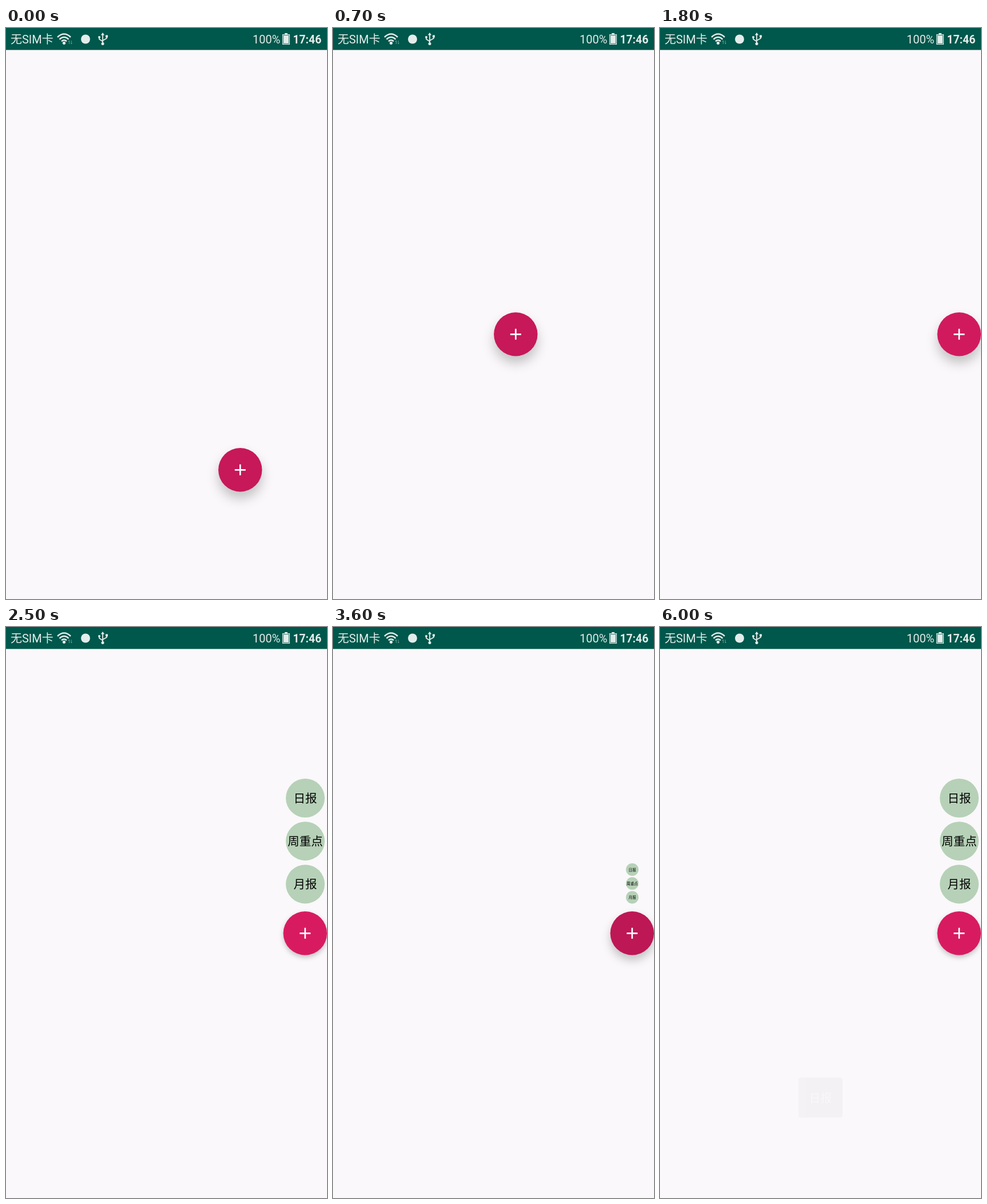
Animation of 561 by 998 pixels, one loop 6100 ms. Source, as an HTML page:

```html
<!DOCTYPE html>
<html lang="zh-CN">
<head>
<meta charset="utf-8">
<title>Floating button menu</title>
<style>
  html, body { margin: 0; width: 100%; height: 100%; overflow: hidden; background: #faf8fa; }
  svg { display: block; width: 100vw; height: 100vh; }
  text { font: 20px Roboto, "Noto Sans CJK SC", "Noto Sans CJK", sans-serif; }
  .status { fill: #e3edeb; }
  .status .clock { font-size: 19.3px; font-weight: 700; }
  .line { fill: none; stroke: #e3edeb; }
  .middle { text-anchor: middle; }
  #menu circle { fill: #b6d1b7; }
  #menu text { font-size: 20.5px; }
</style>
</head>
<body>
<svg viewBox="0 0 561 998">
  <rect width="561" height="998" fill="#faf8fa"/>
  <rect width="561" height="38.4" fill="#00574b"/>

  <g class="status">
    <text x="8" y="27">无SIM卡</text>
    <text x="431" y="27">100%</text>
    <text class="clock" x="501.5" y="27">17:46</text>
    <circle cx="101.5" cy="26.3" r="2.6"/>
    <circle cx="139" cy="19.5" r="8"/>
    <circle cx="169" cy="27.5" r="2.5"/>
    <path d="M169 8l3.2 4.5h-6.4zM174 12.5h4v4h-4z"/>
    <circle cx="163" cy="16" r="2"/>
    <path d="M487 9h5v2h4v18h-13v-18h4z"/>
  </g>
  <g class="line">
    <path stroke-width="2.5" d="M90 16q11.5-11 23 0M93.5 19.8q8-7.5 16 0M97 23.3q4.500-4 9 0"/>
    <path stroke-width="1" opacity=".45" d="M110.5 28v-6l-1.5 2M114 22v6l1.5-2"/>
    <path stroke-width="1.8" d="M169 11v16M163 16v3.5l6 4M176 15v3l-7 4"/>
  </g>
  <rect x="484.7" y="12.7" width="9.6" height="14.6" fill="none" stroke="#00574b" stroke-width=".8"/>

  <g id="menu"></g>
  <g id="fab">
    <circle r="38.2"/>
    <path d="M-9.5 0h19M0-9.5v19" stroke="#fff" stroke-width="2.7"/>
  </g>
  <g id="toast">
    <rect x="242" y="787.5" width="77" height="70" rx="4.5" fill="#b0aeb0"/>
    <text class="middle" x="280.5" y="831" fill="#f4f4f4">日报</text>
  </g>
</svg>
<script>
const LOOP = 6100, STEP = 100;
const [menu, fab, toast] = ["menu", "fab", "toast"].map(id => document.getElementById(id));
const disc = fab.querySelector("circle");

// Items are placed relative to the bottom of the menu, which is its scaling pivot.
menu.innerHTML = ["日报", "周重点", "月报"].map((label, i) => {
  const y = -184.5 + i * 75.2;
  return `<circle cy="${y}" r="34"/><text class="middle" y="${y + 8}">${label}</text>`;
}).join("");

const OPEN = 1900, CLOSE = 3300, REOPEN = 3500;
const TAPS = [OPEN, CLOSE, REOPEN];

const mix = (a, b, p) => a + (b - a) * p;
const ramp = (t, from, duration) => Math.min(1, Math.max(0, (t - from) / duration));
const smooth = p => (1 - Math.cos(Math.PI * p)) / 2;
const slowDown = p => 1 - (1 - p) ** 2;
const sum = (list, fn) => list.reduce((total, item) => total + fn(item), 0);

// The button is dragged to the left edge, then glides to the right one.
const fabX = t => mix(mix(409.3, 48.3, ramp(t, 0, 400)), 522.8, smooth(ramp(t, 400, 550)));
const fabY = t => mix(772.3, 535.3, slowDown(ramp(t, 0, 500)));

const ripple = t => .85 * (1 - ramp(t, 1000, 400) +
  sum(TAPS, tap => ramp(t, tap - 300, 500) - ramp(t, tap + 200, 400)));
const lift = t => Math.min(1, 1 - ramp(t, 1000, 300) +
  sum(TAPS, tap => ramp(t, tap - 300, 100) - ramp(t, tap, 300)));

const toggle = (t, tap) => smooth(ramp(t, tap, 260));
const menuScale = t => toggle(t, OPEN) - toggle(t, CLOSE) + toggle(t, REOPEN);
const toastShow = (t, from, until) => ramp(t, from, 300) - ramp(t, until, 550);

function draw(t) {
  const tint = ripple(t), height = lift(t);
  fab.setAttribute("transform", `translate(${fabX(t)} ${fabY(t)})`);
  disc.style.fill = `rgb(${216 - 20 * tint}, ${27 - 3 * tint}, ${96 - 8 * tint})`;
  disc.style.filter = `drop-shadow(0 ${4 + 8 * height}px ${4 + 6 * height}px rgba(0, 0, 0, .22))`;
  menu.setAttribute("transform", `translate(523 483.5) scale(${menuScale(t)})`);
  toast.setAttribute("opacity", toastShow(t, 2600, 3000) + toastShow(t, 4000, 5500));
}

const start = performance.now();
function tick() {
  const t = (performance.now() - start) % LOOP;
  draw(Math.floor(t / STEP) * STEP);
  requestAnimationFrame(tick);
}
tick();
</script>
</body>
</html>
```
